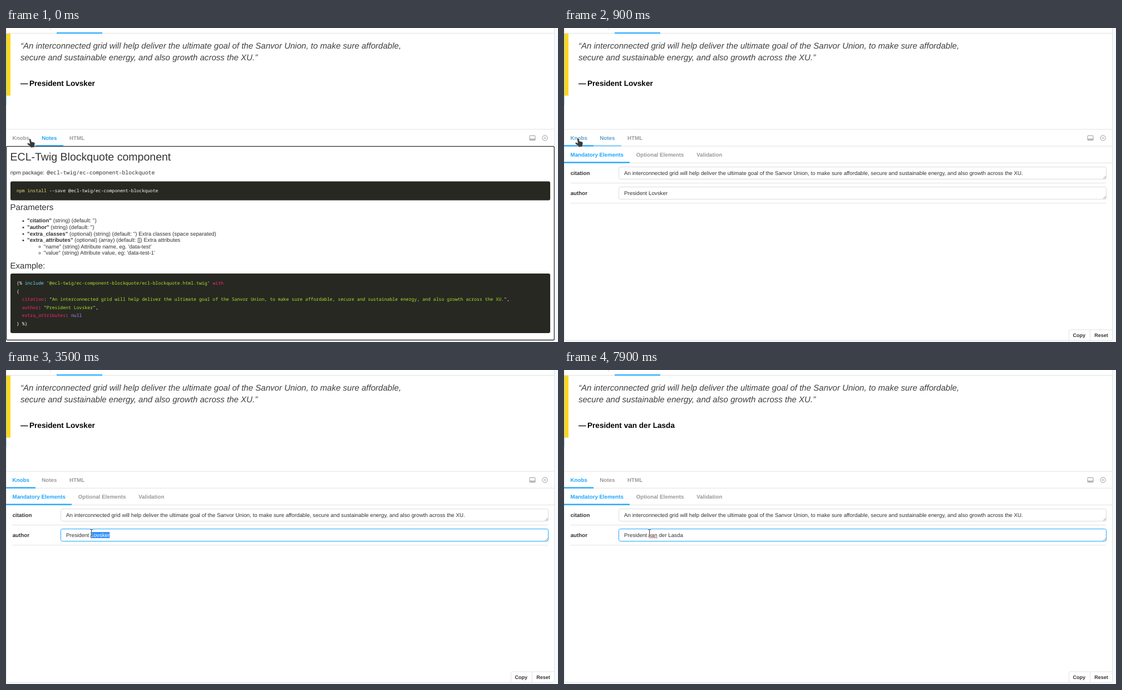
These frames come from a looping animation (992x564 px, 8000 ms). An HTML page:

```html
<!DOCTYPE html>
<html lang="en">
<head>
<meta charset="utf-8">
<title>Blockquote component</title>
<style>
  html, body { margin: 0; width: 100%; height: 100%; overflow: hidden; background: #f6f9fc; }
  svg { display: block; }
  text { font: 9.78px "Liberation Sans", Arial, sans-serif; fill: #333; white-space: pre; text-rendering: geometricPrecision; }
  .b { font-weight: 700; }
  .quote text { font-size: 15.05px; font-style: italic; fill: #404040; }
  text.author { font-size: 13.58px; font-weight: 700; fill: #000; }
  text.h1 { font-size: 19.55px; }
  text.h2 { font-size: 15.05px; }
  text.pkg { font: 9.8px "Noto Sans Mono", "DejaVu Sans Mono", monospace; }
  .code text { font: 8.16px "Noto Sans Mono", "DejaVu Sans Mono", monospace; fill: #f8f8f2; }
  .code rect { fill: #272822; }
  .yellow { fill: #e6db74; }
  .cyan { fill: #66d9ef; }
  .green { fill: #a6e22e; }
  .pink { fill: #f92672; }
  .violet { fill: #ae81ff; }
  text.tab { font-weight: 700; fill: #999; }
  text.on { fill: #1ea7fd; }
  text.btn { font-size: 9.03px; font-weight: 700; }
  .line { fill: none; stroke: #e2e2e2; }
  .blue { fill: #1ea7fd; }
  .icon { fill: none; stroke: #999; }
  .field { fill: #fff; stroke: #dcdcdc; }
  .focus { stroke: #1ea7fd; }
  .grip { fill: none; stroke: #777; stroke-width: .8; }
  .hide { display: none; }
</style>
</head>
<body>
<svg width="992" height="564" viewBox="0 0 992 564">
  <defs>
    <path id="grip" class="grip" d="M-5.5 -.8 L-.6 -5.7 M-2.8 -.8 L-.6 -3"/>
    <clipPath id="slim"><path d="M99 250h875v7h-875z M99 274.600h875v7h-875z"/></clipPath>
  </defs>

  <!-- preview -->
  <rect x=".5" y="-10" width="985" height="571" rx="3" fill="#fff" stroke="#e0e4e8"/>
  <path class="line" d="M0 9.500H985.500 M80 0V4 M0 182H985.500"/>
  <rect class="blue" x="91" y="8" width="82" height="2"/>
  <rect x="1" y="10" width="7" height="111.500" fill="#ffd617"/>
  <rect x="0" y="10" width="1" height="128.500" fill="#8fd0f8"/>
  <g class="quote">
    <text x="25.9" y="37.300">“An interconnected grid will help deliver the ultimate goal of the Sanvor Union, to make sure affordable,</text>
    <text x="25.9" y="58.300">secure and sustainable energy, and also growth across the XU.”</text>
  </g>
  <text class="author" x="25.9" y="103.600">—</text>
  <text class="author" id="cite" x="42" y="103.600"></text>

  <!-- panel tabs -->
  <path class="line" d="M0 212.200H985.500"/>
  <text class="tab" id="knobs" x="11.5" y="201">Knobs</text>
  <text class="tab" id="notes" x="64.300" y="201">Notes</text>
  <text class="tab" x="114" y="201">HTML</text>
  <rect class="blue" id="knobsBar" x="0" y="210.400" width="53" height="2.300"/>
  <rect class="blue" id="notesBar" x="53" y="210.400" width="50" height="2.300"/>
  <g class="icon">
    <rect x="941" y="193.300" width="10" height="8.400" rx=".8"/>
    <path d="M941 199.500H951" stroke-width="1.200"/>
    <path d="M942.500 200.700H950" stroke-dasharray="1 1"/>
    <circle cx="968.5" cy="197.500" r="4.700"/>
    <path d="M966.700 195.700l3.600 3.600m0 -3.600l-3.600 3.600"/>
  </g>

  <g id="notesPane">
    <text class="h1" x="7.500" y="237.500">ECL-Twig Blockquote component</text>
    <text x="7.700" y="262.500">npm package:</text>
    <text class="pkg" x="73.300" y="262.500">@ecl-twig/ec-component-blockquote</text>
    <g class="code">
      <rect x="8" y="275.500" width="970" height="34" rx="3"/>
      <text x="19" y="295"><tspan class="yellow">npm install</tspan> --save @ecl-twig/ec-component-blockquote</text>
    </g>
    <text class="h2" x="7.500" y="327">Parameters</text>
    <g fill="#333">
      <circle cx="31" cy="346.800" r="1.500"/>
      <circle cx="31" cy="358.300" r="1.500"/>
      <circle cx="31" cy="369.900" r="1.500"/>
      <circle cx="31" cy="381.400" r="1.500"/>
    </g>
    <g fill="none" stroke="#333" stroke-width=".8">
      <circle cx="60.500" cy="393" r="1.600"/>
      <circle cx="60.500" cy="404.500" r="1.600"/>
    </g>
    <text x="38" y="349.400"><tspan class="b">"citation"</tspan> (string) (default: '')</text>
    <text x="38" y="361"><tspan class="b">"author"</tspan> (string) (default: '')</text>
    <text x="38" y="372.500"><tspan class="b">"extra_classes"</tspan> (optional) (string) (default: '') Extra classes (space separated)</text>
    <text x="38" y="384"><tspan class="b">"extra_attributes"</tspan> (optional) (array) (default: []) Extra attributes</text>
    <text x="67.700" y="395.600">"name" (string) Attribute name, eg. 'data-test'</text>
    <text x="67.700" y="407.100">"value" (string) Attribute value, eg: 'data-test-1'</text>
    <text class="h2" x="7.500" y="432.200">Example:</text>
    <g class="code">
      <rect x="8" y="441" width="970" height="107" rx="3"/>
      <text x="19" y="461">{% <tspan class="cyan">include</tspan> '<tspan class="green">@ecl-twig/ec-component-blockquote/ecl-blockquote.html.twig</tspan>' <tspan class="pink">with</tspan></text>
      <text x="19" y="475.600">{</text>
      <text x="28.800" y="490.200"><tspan class="pink">citation</tspan>: "<tspan class="green">An interconnected grid will help deliver the ultimate goal of the Sanvor Union, to make sure affordable, secure and sustainable energy, and also growth across the XU.</tspan>",</text>
      <text x="28.800" y="504.800"><tspan class="pink">author</tspan>: "<tspan class="green">President Lovsker</tspan>",</text>
      <text x="28.800" y="519.400"><tspan class="pink">extra_attributes</tspan>: <tspan class="violet">null</tspan></text>
      <text x="19" y="534">} %}</text>
    </g>
    <rect id="ring" x=".7" y="212.700" width="984.600" height="347.800" rx="2" fill="none" stroke="#333" stroke-width="1.300"/>
  </g>

  <g id="knobsPane">
    <path class="line" d="M0 242.300H985.500"/>
    <text class="tab on" x="11.500" y="231">Mandatory Elements</text>
    <text class="tab" x="129.700" y="231">Optional Elements</text>
    <text class="tab" x="238.300" y="231">Validation</text>
    <rect class="blue" x="0" y="240.400" width="118" height="2.300"/>

    <g id="slimRows">
      <text class="b" x="11.700" y="257.900">citation</text>
      <text class="b" x="11.700" y="282.900">author</text>
      <rect class="field" x="98.500" y="249.500" width="876" height="7.500" rx="2"/>
      <rect class="field" x="98.500" y="274.100" width="876" height="7.500" rx="2"/>
      <g clip-path="url(#slim)">
        <text x="108" y="263">An interconnected grid will help deliver the ultimate goal of the Sanvor Union, to make sure affordable, secure and sustainable energy, and also growth across the XU.</text>
        <text x="108" y="287.600">President Lovsker</text>
      </g>
      <path fill="#d9d9d9" d="M963.500 249.500h10.500v7.500h-10.500z M963.500 274.100h10.500v7.500h-10.500z"/>
      <use href="#grip" x="974" y="257"/>
      <use href="#grip" x="974" y="281.600"/>
      <path class="line" d="M11.500 267.300H974 M11.500 292H974"/>
    </g>

    <g id="fullRows">
      <text class="b" x="11.700" y="263.500">citation</text>
      <text class="b" x="11.700" y="299.700">author</text>
      <rect class="field" x="98.500" y="249.500" width="876" height="22" rx="3"/>
      <rect class="field" id="authorBox" x="98.500" y="285.500" width="876" height="22" rx="3"/>
      <text x="108" y="263.700">An interconnected grid will help deliver the ultimate goal of the Sanvor Union, to make sure affordable, secure and sustainable energy, and also growth across the XU.</text>
      <text id="author" x="108" y="299.800"></text>
      <g id="picked">
        <rect x="152" y="291" width="34.300" height="11" fill="#3390ff"/>
        <text x="152" y="299.800" style="fill:#fff">Lovsker</text>
      </g>
      <path id="wave" d="M152 301.200q1 -1.300 2 0t2 0t2 0t2 0t2 0t2 0t2 0t2 0" fill="none" stroke="#e0392b" stroke-width=".9"/>
      <rect id="caret" y="291.300" width=".8" height="10.500" fill="#222"/>
      <use href="#grip" x="974.500" y="271.500"/>
      <use href="#grip" x="974.500" y="307.500"/>
      <path class="line" d="M11.500 278.500H974 M11.500 314.700H974"/>
    </g>

    <path d="M907.500 561V544.500q0 -2.500 2.500 -2.500H985.500 M945.500 542V561" class="line"/>
    <text class="btn" x="914.600" y="555.300">Copy</text>
    <text class="btn" x="953.200" y="555.300">Reset</text>
  </g>

  <g id="pointer">
    <path id="hand" d="M-1.500 1.300Q-1.200 -.2 .2 -.1Q1.500 0 1.800 1.200L2.800 5.300L7.300 6.200Q9 6.800 9 8.600L8.500 11.500V15L1.200 16L.7 14L-4.400 9.900Q-5.400 8.400 -4 7.600Q-2.700 7.200 -.2 9Z" fill="#3a3a3a" stroke="#fff" stroke-width=".5"/>
    <path id="arrow" d="M0 0V12.500L3 9.800L5 14.200L7 13.300L5 9H9Z" fill="#3a3a3a" stroke="#fff" stroke-width=".5"/>
    <g id="beam" fill="none">
      <path d="M-2.600 -6H2.600M0 -6V6M-2.600 6H2.600" stroke="#fff" stroke-width="2"/>
      <path d="M-2.600 -6H-.6L0 -5.500L.6 -6H2.600M0 -5.500V5.500M-2.600 6H-.6L0 5.500L.6 6H2.600" stroke="#333" stroke-width="1"/>
    </g>
  </g>
</svg>
<script>
const LOOP = 8000, TICK = 100;
const OLD = "President Lovsker", NEW = "President van der Lasda";
const BLUE = [30, 167, 253], GRAY = [153, 153, 153];

// [time, letters of NEW shown]
const typing = [[4700, 12], [4800, 13], [5100, 14], [5200, 15], [5300, 16], [5400, 17],
  [5700, 18], [6000, 20], [6700, 21], [6800, 22], [7400, 23]];
const preview = [[6400, 20], [7100, 22], [7700, 23]];

// [time, x, y], straight moves between the points
const path = [[0, 43, 199], [200, 43, 199], [300, 33, 201], [400, 25, 198], [1500, 25, 198],
  [1600, 34.5, 201], [2300, 197, 303], [2400, 197, 303], [2600, 199.7, 298.5],
  [3400, 199.7, 298.5], [3500, 153.7, 292.7], [LOOP, 153.7, 292.7]];

const $ = id => document.getElementById(id);
const show = (id, on) => $(id).classList.toggle("hide", !on);
const ramp = (t, a, b) => Math.min(1, Math.max(0, (t - a) / (b - a)));
const mix = (a, b, k) => `rgb(${a.map((v, i) => Math.round(v + (b[i] - v) * k))})`;

function textAt(steps, t) {
  const step = steps.filter(s => s[0] <= t).pop();
  return step ? NEW.slice(0, step[1]) : OLD;
}

function setText(id, text) {
  if ($(id).textContent !== text) $(id).textContent = text;
}

function pointAt(t) {
  const i = Math.max(1, path.findIndex(p => p[0] >= t));
  const [a, b] = [path[i - 1], path[i]];
  const k = ramp(t, a[0], b[0]);
  return [a[1] + (b[1] - a[1]) * k, a[2] + (b[2] - a[2]) * k];
}

function cursorKind(x, y) {
  if (y < 242) return "hand";
  const inField = x > 98 && ((y > 249 && y < 272) || (y > 285 && y < 308));
  return inField ? "beam" : "arrow";
}

function draw(now) {
  const t = Math.floor((now % LOOP) / TICK) * TICK;

  show("ring", t < 600);
  show("notesPane", t < 800);
  show("knobsPane", t >= 800);
  show("slimRows", t < 900);
  show("fullRows", t >= 900);

  const swap = ramp(t, 800, 1000);
  $("knobs").style.fill = mix(GRAY, BLUE, swap);
  $("notes").style.fill = mix(BLUE, GRAY, swap);
  $("knobsBar").style.opacity = ramp(t, 600, 800);
  $("notesBar").style.opacity = 1 - swap;

  setText("author", textAt(typing, t));
  setText("cite", textAt(preview, t));
  $("authorBox").classList.toggle("focus", t >= 3500);
  show("picked", t >= 3500 && t < 4700);
  show("wave", t >= 5100);
  show("caret", t >= 4700 && t < 7900);
  if (t >= 4700) $("caret").setAttribute("x", 107.6 + $("author").getComputedTextLength());

  const [x, y] = pointAt(t), kind = cursorKind(x, y);
  $("pointer").setAttribute("transform", `translate(${x} ${y})`);
  for (const id of ["hand", "arrow", "beam"]) show(id, id === kind);
}

const start = performance.now();
function frame() {
  draw(performance.now() - start);
  requestAnimationFrame(frame);
}
frame();
</script>
</body>
</html>
```
